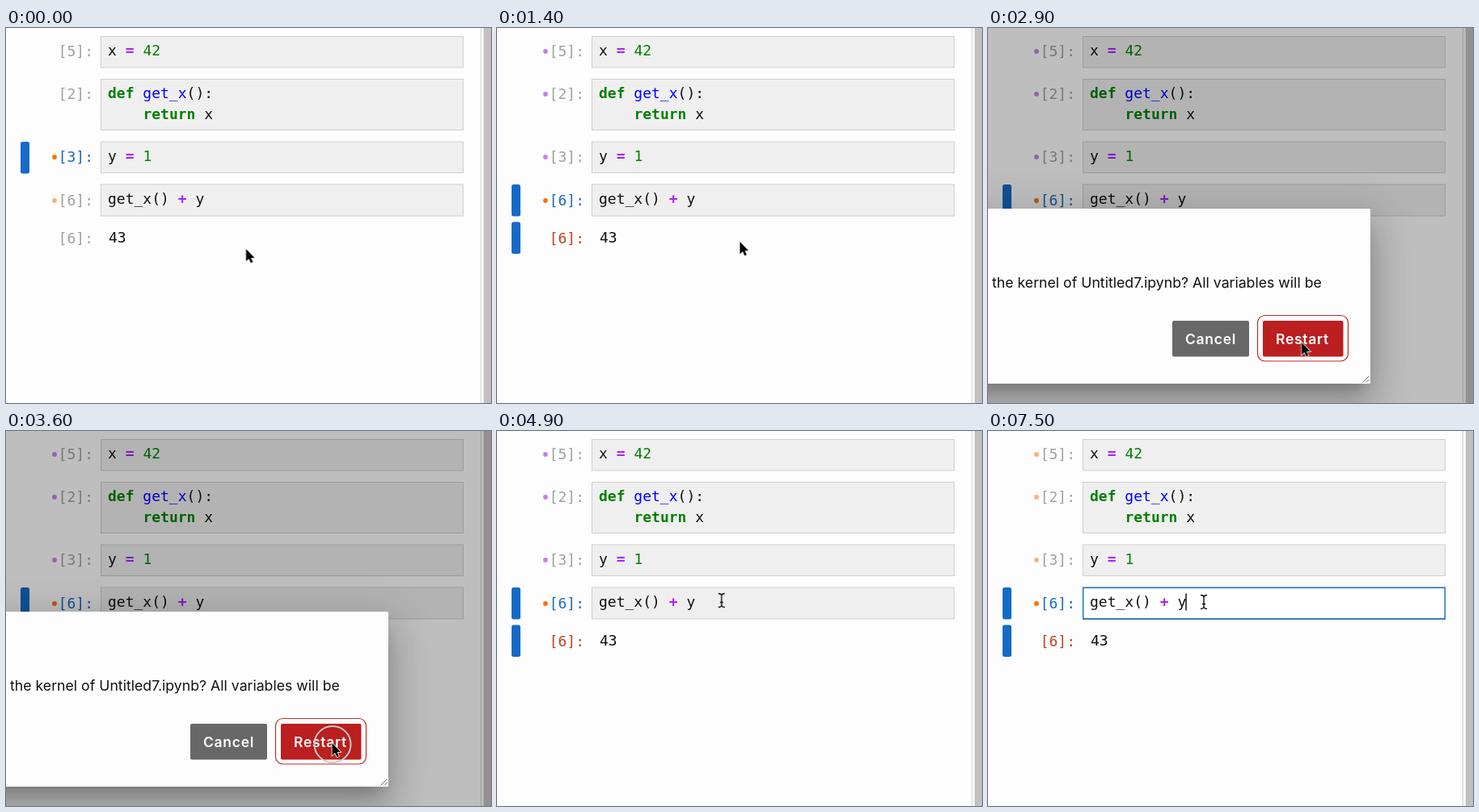
An HTML page for the animation above (8 s loop, 600x465 px).

```html
<!DOCTYPE html>
<html lang="en">
<head>
<meta charset="utf-8">
<title>Notebook</title>
<style>
html, body { margin: 0; width: 100%; height: 100%; overflow: hidden; background: #fdfdfd; }
svg { display: block; width: 100%; height: 100%; }

text { font: 18px "DejaVu Sans Mono", monospace; fill: #111; }
.kw { font-weight: 700; fill: #008000; }
.op { font-weight: 700; fill: #a2f; }
.num { fill: #008000; }
.fn { fill: #00f; }
.prompt text { text-anchor: end; fill: #a0a0a0; }
.prompt .in { fill: #1b6bc0; }
.prompt .out { fill: #bf431b; }
.cell { fill: #efefef; stroke: #cfcfcf; }
.bar { fill: #156ac8; }
.ready { fill: #f97206; }
.stale { fill: #f9b27c; }
.linked { fill: #c580ef; }

.panel {
  position: absolute; left: -60px; top: 223.5px; width: 532.5px; height: 217px;
  border-radius: 1.5px; background: #fdfdfd;
  box-shadow: 0 14px 18px -8px rgba(0,0,0,.2), 0 28px 43px 4px rgba(0,0,0,.14), 0 11px 53px 10px rgba(0,0,0,.12);
}
.dialog .message { font: 17.7px Inter, sans-serif; }
.dialog .label { font: 600 17.5px Inter, sans-serif; letter-spacing: .7px; fill: #fff; }

/* One shared 8 s timeline; 1% = 80 ms */
.before, .after, .checking, .links, .pending, .dialog, .hot, .focus, .caret, .arrow, .beam {
  animation: 8s step-end infinite;
}
.before { animation-name: before; }
.after { animation-name: after; }
.checking { animation-name: checking; }
.links { animation-name: links; }
.pending { animation-name: pending; }
.dialog { animation-name: dialog; }
.hot { animation-name: hot; }
.focus { animation-name: focus; }
.caret { animation-name: caret; }
.arrow { animation-name: arrow; }
.beam { animation-name: beam; }
@keyframes before { 0% { visibility: visible } 3.5%, 100% { visibility: hidden } }
@keyframes after { 0% { visibility: hidden } 3.5%, 100% { visibility: visible } }
@keyframes checking { 0%, 12.25%, 100% { visibility: hidden } 3.5% { visibility: visible } }
@keyframes links { 0%, 74.75%, 100% { visibility: hidden } 12.25% { visibility: visible } }
@keyframes pending { 0% { visibility: hidden } 81%, 100% { visibility: visible } }
@keyframes dialog { 0%, 46%, 100% { visibility: hidden } 21% { visibility: visible } }
@keyframes hot { 0% { fill: #cc2727 } 30.5%, 100% { fill: #bb1f1f } }
@keyframes focus { 0% { visibility: hidden } 63.5%, 100% { visibility: visible } }
@keyframes caret { 0%, 71%, 86% { opacity: 0 } 63.5%, 78.5%, 93.5%, 100% { opacity: 1 } }
@keyframes arrow { 0% { visibility: visible } 52%, 100% { visibility: hidden } }
@keyframes beam { 0% { visibility: hidden } 52%, 100% { visibility: visible } }

/* Ring shown around the pointer at each press */
.press { fill: none; stroke: #c8c8c8; stroke-width: 2; opacity: 0; animation: press 8s linear infinite; }
@keyframes press { 0%, 2% { opacity: 1 } 5.2%, 100% { opacity: 0 } }

.pointer { animation: pointer 8s ease-in-out infinite; }
@keyframes pointer {
  0%, 1% { transform: translate(296.5px, 274px) }
  3.5%, 22% { transform: translate(300px, 265px) }
  33.5%, 36.5% { transform: translate(387.5px, 390px) }
  43%, 46.9% { transform: translate(403px, 387px) }
  53.5%, 61% { transform: translate(278px, 210px) }
  63.5%, 100% { transform: translate(267px, 212px) }
}
</style>
</head>
<body>
<svg viewBox="0 0 600 465" preserveAspectRatio="none">
  <defs>
    <circle id="dot" cx="60" r="2.9"/>
    <g id="upper">
      <use href="#dot" y="29"/>
      <use href="#dot" y="82"/>
      <use href="#dot" y="160"/>
    </g>
  </defs>

  <rect width="600" height="465" fill="#fdfdfd"/>
  <rect x="587" width="1" height="465" fill="#d6d6d6"/>
  <rect x="588" width="3" height="465" fill="#f8f8f8"/>
  <rect x="591" width="9" height="465" fill="#c1c1c1"/>

  <g class="cell">
    <rect x="117.5" y="10.5" width="448" height="38.5"/>
    <rect x="117.5" y="63.5" width="448" height="63"/>
    <rect x="117.5" y="141" width="448" height="38.5"/>
    <rect x="117.5" y="194" width="448" height="39"/>
  </g>
  <g class="focus">
    <rect x="117.7" y="194.3" width="447.6" height="38.7" fill="#fff" stroke="#1b70cc" stroke-width="1.5"/>
    <path d="M118 233H565" stroke="#123a66" stroke-dasharray="1 1"/>
    <rect class="caret" x="244.3" y="201.5" width="1.4" height="21" fill="#000"/>
  </g>

  <g transform="translate(0 -.6)">
    <text x="126" y="35">x <tspan class="op">=</tspan> <tspan class="num">42</tspan></text>
    <text x="126" y="88"><tspan class="kw">def</tspan> <tspan class="fn">get_x</tspan>():</text>
    <text x="169.4" y="113.5"><tspan class="kw">return</tspan> x</text>
    <text x="126" y="166">y <tspan class="op">=</tspan> <tspan class="num">1</tspan></text>
    <text x="126" y="219">get_x() <tspan class="op">+</tspan> y</text>
    <text x="127" y="267">43</text>
  </g>

  <g class="prompt">
    <text x="108" y="35">[5]:</text>
    <text x="108" y="88">[2]:</text>
    <g class="before">
      <rect class="bar" x="18" y="141" width="11" height="39.5" rx="2.5"/>
      <text class="in" x="108" y="165.5">[3]:</text>
      <text x="108" y="219.5">[6]:</text>
      <text x="108" y="266.5">[6]:</text>
      <use class="ready" href="#dot" y="160"/>
      <use class="stale" href="#dot" y="214"/>
    </g>
    <g class="after">
      <rect class="bar" x="18" y="194" width="11" height="39.5" rx="2.5"/>
      <rect class="bar" x="18" y="240.5" width="11" height="39.5" rx="2.5"/>
      <text x="108" y="165.5">[3]:</text>
      <text class="in" x="108" y="219.5">[6]:</text>
      <text class="out" x="108" y="266.5">[6]:</text>
    </g>
    <g class="checking">
      <use class="stale" href="#dot" y="160"/>
      <use class="ready" href="#dot" y="214"/>
    </g>
    <g class="links">
      <use class="linked" href="#upper"/>
      <use class="ready" href="#dot" y="214"/>
    </g>
    <g class="pending">
      <use class="stale" href="#upper"/>
      <use class="ready" href="#dot" y="214"/>
    </g>
  </g>

  <g class="dialog">
    <rect width="600" height="465" fill="#000" fill-opacity=".25"/>
    <foreignObject width="600" height="465"><div class="panel"></div></foreignObject>
    <text class="message" x="5" y="322">the kernel of Untitled7.ipynb? All variables will be</text>
    <rect x="228" y="363" width="95" height="44.5" rx="2" fill="#686868"/>
    <text class="label" x="244" y="391.5">Cancel</text>
    <rect x="333.5" y="356.5" width="112" height="56.5" rx="9" fill="none" stroke="#c62828" stroke-width="1.2"/>
    <rect class="hot" x="340" y="363" width="99.5" height="44.5" rx="2"/>
    <text class="label" x="356" y="391.5">Restart</text>
    <path d="M463.5 439.5L471.5 431.5M468 439.5L471.5 436" stroke="#666" fill="none"/>
  </g>

  <circle class="press" cx="301" cy="266" r="22.5" style="animation-delay: .28s"/>
  <circle class="press" cx="404" cy="388.5" r="22.5" style="animation-delay: 3.48s"/>
  <circle class="press" cx="267" cy="212" r="22.5" style="animation-delay: 5.08s"/>

  <g class="pointer">
    <path class="arrow" d="M.5 0V15.2L4 12L6.3 17.3L8.9 16.2L6.6 11H11Z" fill="#000" stroke="#fff" stroke-width="1.6" paint-order="stroke"/>
    <path class="beam" d="M-4 -8.5Q-.8 -8.5 0 -6.5Q.8 -8.5 4 -8.5M0 -6.5V6.5M-4 8.5Q-.8 8.5 0 6.5Q.8 8.5 4 8.5M-2 2.5H2" fill="none" stroke="#111" stroke-width="1.4"/>
  </g>
</svg>
</body>
</html>
```
